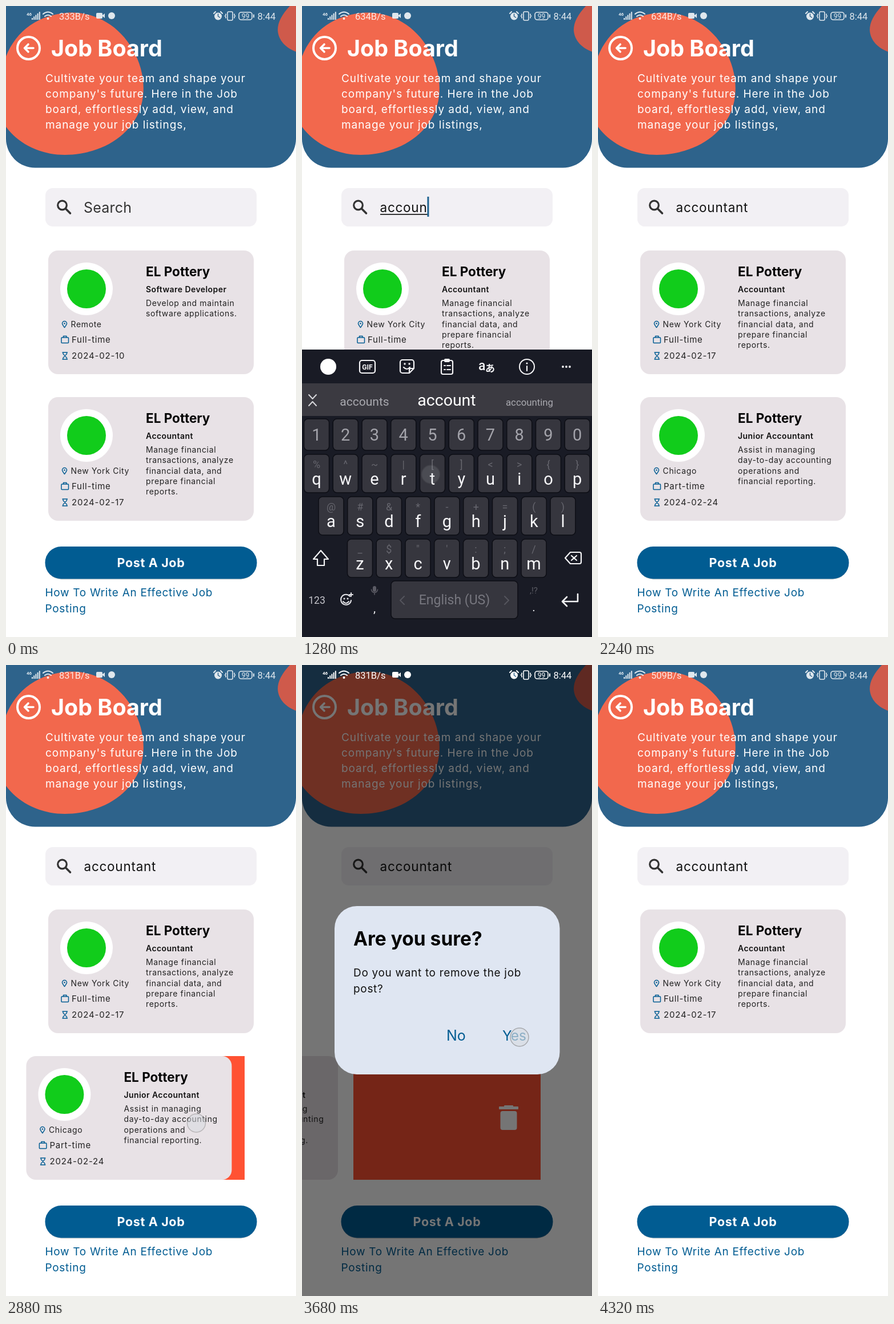
Animation, 508 px wide and 1102 px high, one loop 4.48 s. Source, as an HTML page:

```html
<!DOCTYPE html>
<html lang="en">
<head>
<meta charset="utf-8">
<title>Job Board</title>
<style>
  html, body { margin: 0; width: 100%; height: 100%; overflow: hidden; background: #fff; }
  svg { display: block; width: 100vw; height: 100vh; }
  text { font-family: Inter, sans-serif; white-space: pre; }
  .kb text, .status text { font-family: Roboto, "Noto Sans CJK JP", "Noto Sans CJK", sans-serif; }
  .line { fill: none; stroke-linecap: round; stroke-linejoin: round; }
  .soft { filter: blur(.7px); }
</style>
</head>
<body>
<svg id="stage" viewBox="0 0 508 1102" preserveAspectRatio="none"></svg>
<script>
const BLUE = '#015c92', LOOP = 4480, STEP = 80;
const esc = s => s.replace(/&/g, '&amp;').replace(/</g, '&lt;');
const text = (x, y, size, str, fill = '#111', more = '') =>
  `<text x="${x}" y="${y}" font-size="${size}" fill="${fill}" ${more}>${esc(str)}</text>`;
const lines = (x, y, gap, size, list, fill, more) =>
  list.map((s, i) => text(x, y + i * gap, size, s, fill, more)).join('');
const rect = (x, y, w, h, r, fill, more = '') =>
  `<rect x="${x}" y="${y}" width="${w}" height="${h}" rx="${r}" fill="${fill}" ${more}/>`;
const disc = (x, y, r, fill, more = '') => `<circle cx="${x}" cy="${y}" r="${r}" fill="${fill}" ${more}/>`;
const line = (d, color, width, more = '') =>
  `<path class="line" d="${d}" stroke="${color}" stroke-width="${width}" ${more}/>`;
const group = (id, body, more = '') => `<g id="${id}" ${more}>${body}</g>`;
const space = n => `letter-spacing="${n}"`;
const bold = 'font-weight="700"', mid = 'text-anchor="middle"';

const header = `
  <path d="M0 0H508V231A51 51 0 0 1 457 282.500H51A51 51 0 0 1 0 231Z" fill="#2e638b"/>
  <path class="soft" d="M-4 100C10 52 48 17 105 12C152 8 197 32 222 76C245 115 248 165 225 200C200 240 150 260 103 260C55 260 15 236 -4 205Z" fill="#f2684d"/>
  <path class="soft" d="M499 -2C483 15 476 28 476 42C477 60 490 74 511 81V-2Z" fill="#cf5a4b"/>` +
  disc(39.5, 73.5, 19.5, 'none', 'stroke="#fff" stroke-width="4"') +
  line('M48 73.5H33M39 67l-6.5 6.5 6.5 6.5', '#fff', 3.6) +
  text(79, 88, 39.4, 'Job Board', '#fff', bold) +
  lines(69, 133, 27, 19, ['Cultivate your team and shape your', "company's future. Here in the Job",
    'board, effortlessly add, view, and', 'manage your job listings,'], '#fff', space(.94));

const search = rect(69, 318, 370, 67, 13, '#f2f0f4') +
  disc(98.5, 348, 7.8, 'none', 'stroke="#333" stroke-width="3.2"') +
  line('M104.5 354L112.5 362', '#333', 3.6) +
  text(136, 361, 25, 'Search', '#333', 'id="hint" ' + space(.2)) +
  text(136.5, 360, 22.5, '', '#111', 'id="query" ' + space(.75)) +
  rect(137, 363, 0, 1.8, 0, '#222', 'id="underline"') +
  rect(136.5, 333, 3, 35, 0, '#1f6391', 'id="caret"');

function card(id, title, place, kind, date, about) {
  return group(id, rect(74, 427, 360, 216, 17, '#e8e2e6') +
    disc(141, 494, 46, '#fff') + disc(141, 494, 34, '#11cc1b') +
    line('M102.5 561.5C99.5 557.5 98.5 556 98.5 554.5a4 4 0 0 1 8 0C106.5 556 105.5 557.5 102.5 561.5Z', BLUE, 1.5) +
    disc(102.5, 554.5, 1.3, BLUE) +
    rect(97, 579, 12.5, 9.5, 1, 'none', `stroke="${BLUE}" stroke-width="1.5"`) +
    line('M100.5 578.5v-2h5.5v2', BLUE, 1.5) +
    line('M99 605h8.5M99 617h8.5M100 605v2.5l6.5 7v2.5M106.5 605v2.5l-6.5 7v2.5', BLUE, 1.4) +
    text(113.5, 561, 14, place, '#222', space(.65)) +
    text(115, 588, 15, kind, '#222', space(.75)) +
    text(115, 616, 15, date, '#222', space(.82)) +
    text(245, 472, 22.5, 'EL Pottery', '#050505', bold) +
    text(245, 500, 14, title, '#111', 'font-weight="600" ' + space(.43)) +
    lines(245, 524, 18.3, 14, about, '#222', space(.64)));
}

const cards = card('dev', 'Software Developer', 'Remote', 'Full-time', '2024-02-10',
    ['Develop and maintain', 'software applications.']) +
  card('acc', 'Accountant', 'New York City', 'Full-time', '2024-02-17',
    ['Manage financial', 'transactions, analyze', 'financial data, and', 'prepare financial', 'reports.']) +
  group('bin', rect(90, 683, 328, 216, 0, '#ff5233') +
    rect(345, 771, 34, 5, 1, '#fff') + rect(354, 769, 16, 4, 1, '#fff') + rect(347.5, 779, 29, 33, 4, '#fff')) +
  card('junior', 'Junior Accountant', 'Chicago', 'Part-time', '2024-02-24',
    ['Assist in managing', 'day-to-day accounting', 'operations and', 'financial reporting.']);

const footer = rect(69, 945.5, 370, 56, 28, '#000', 'class="soft" opacity=".2"') + rect(68.5, 944, 371, 56.5, 28, BLUE) +
  text(194.5, 980, 21.5, 'Post A Job', '#fff', bold + space(.65)) +
  lines(68.5, 1031, 28, 19, ['How To Write An Effective Job', 'Posting'], BLUE, space(.7));

// Keyboard
const ROWS = [
  { x: 25.5, y: 783, keys: 'qwertyuiop', hints: '%^~|[]<>{}' },
  { x: 51, y: 857, keys: 'asdfghjkl', hints: '@#&*-+=()' },
  { x: 101.5, y: 931, keys: 'zxcvbnm', hints: '_$"\':;/' }
];
const PITCH = 50.75;
const keycap = (x, y, w, h) => rect(x, y, w, h, 7, '#36363e', 'stroke="#0d0e15" stroke-width="1.5"');
const keyPos = ch => {
  const row = ROWS.find(r => r.keys.includes(ch));
  return [row.x + PITCH * row.keys.indexOf(ch) - 3, row.y + 35];
};
const white = (d, w = 2.2) => line(d, '#f4f4f6', w);
const box = (x, y, w, h, r) => rect(x, y, w, h, r, 'none', 'stroke="#f4f4f6" stroke-width="2.2"');

const toolbar = disc(46, 630, 14, '#fff') +
  box(101, 619, 27, 22, 4) + text(114.5, 635, 12, 'GIF', '#f4f4f6', mid + ' ' + bold) +
  white('M176 618h16a4 4 0 0 1 4 4v11l-8 8h-12a4 4 0 0 1-4-4v-15a4 4 0 0 1 4-4M196 633h-5a3 3 0 0 0-3 3v5M178 631q6 6 11 0') +
  disc(180, 625, 1.7, '#f4f4f6') + disc(188, 625, 1.7, '#f4f4f6') +
  box(244, 619, 20, 24, 3) + rect(249, 616, 10, 6, 2, '#f4f4f6') + white('M249 628h2M254 628h6M249 635h2M254 635h6', 2) +
  text(309, 636, 23, 'a', '#f4f4f6', 'font-weight="500"') + text(321, 639, 17, 'あ', '#f4f4f6', bold) +
  disc(394, 630, 13, 'none', 'stroke="#f4f4f6" stroke-width="2"') + disc(394, 624, 1.6, '#f4f4f6') + white('M394 629v8') +
  [457, 463, 469].map(x => disc(x, 630, 1.9, '#f4f4f6')).join('');

const bottomRow = white('M33 951L20 966H27V977H39V966H46Z') +
  white('M470 954H486a3 3 0 0 1 3 3v14a3 3 0 0 1-3 3H470L461 964ZM472 960l9 8M481 960l-9 8') +
  text(26, 1044, 17.5, '123', '#c4c4ca', mid) +
  line('M84 1031A9 9 0 1 0 86 1038M72 1040q5 6 10 0M83 1028h6M86 1025v6', '#e4e4e8', 2) +
  disc(74, 1035, 1.5, '#e4e4e8') + disc(80, 1035, 1.5, '#e4e4e8') +
  rect(124, 1013, 6, 10, 3, '#5c5c65') + line('M121.5 1019a5.5 5.5 0 0 0 11 0M127 1025v3', '#5c5c65', 1.5) +
  text(127, 1059, 21, ',', '#f4f4f6', mid) +
  keycap(156, 1004, 222, 66) + text(267, 1045, 23, 'English (US)', '#77777f', mid) +
  line('M179 1031l-7 7 7 7M355 1031l7 7-7 7', '#55555d', 2) +
  text(406, 1026, 15, ',!?', '#5c5c65', mid) + text(406, 1057, 21, '.', '#f4f4f6', mid) +
  white('M483 1027V1040H457M464 1032l-8 8 8 8', 2.6);

const keyboard = group('kb',
  rect(0, 600, 508, 502, 0, '#191b25') + rect(0, 659, 508, 57, 0, '#3b3a41') + toolbar +
  line('M12 679l6.5 7 6.5-7M12 698l6.5-7 6.5 7', '#d6d6da', 2) +
  [109.5, 253.5, 398.5].map((x, i) => text(x, 698, 27, '', i == 1 ? '#fff' : '#a9a9af', mid + ' class="word"')).join('') +
  [...'1234567890'].map((n, i) => {
    const x = 25.5 + PITCH * i;
    return keycap(x - 22, 721, 44, 55) + text(x, 759, 29, n, '#a4a4ab', mid);
  }).join('') +
  ROWS.map(r => [...r.keys].map((k, i) => {
    const x = r.x + PITCH * i;
    return keycap(x - 22, r.y, 44, 67) + text(x, r.y + 24, 18, r.hints[i], '#66666e', mid) +
      text(x, r.y + 53, 29, k, '#f8f8fa', mid);
  }).join('')).join('') + bottomRow, 'class="kb"');

const dialog = group('dialog', rect(0, 0, 508, 1102, 0, '#000', 'opacity=".54"') +
  rect(57, 421, 394.5, 294, 39, '#dfe6f2') +
  text(90, 490, 33.5, 'Are you sure?', '#050505', bold) +
  lines(90, 544, 28, 19, ['Do you want to remove the job', 'post?'], '#111', space(.68)) +
  text(253, 656, 25, 'No', BLUE) + text(351, 656, 24.5, 'Yes', BLUE));

const thin = (d, w = 1.6) => line(d, '#fff', w);
const status = group('status',
  text(36, 17, 8, '46', '#fff', bold) +
  [0, 1, 2, 3, 4].map(i => rect(45 + i * 3.2, 21 - i * 2.7, 2, 3 + i * 2.7, 0, '#fff')).join('') +
  thin('M65 14q8.500-7 17 0M68 18q5.500-4.500 11 0', 2) + disc(73.5, 22, 2, '#fff') +
  text(93, 24, 16.5, '', '#fff', 'id="speed"') +
  rect(158, 12, 11, 10, 2, '#fff') + '<path d="M168 17l5-4v8Z" fill="#fff"/>' +
  disc(185, 17, 6, '#fff') +
  disc(371.5, 18, 6.5, '#fff') + thin('M364 13l3-3M379 13l-3-3', 2) + line('M371.500 14v4l3 2', '#2e638b', 1.5) +
  rect(388, 10, 9, 15, 2, 'none', 'stroke="#fff" stroke-width="1.6"') + thin('M385 14v2l-1.500 1.500 1.500 1.500v2M400 14v2l1.500 1.500-1.500 1.500v2') +
  rect(408, 11, 23, 13, 4, 'none', 'stroke="#fff" stroke-width="1.6"') + thin('M434 15.500v4', 2) +
  text(419.5, 22, 12, '99', '#fff', mid) + text(440.5, 24, 16.5, '8:44', '#fff'), 'class="status"');

const stage = document.getElementById('stage');
stage.innerHTML = header + search + cards + footer + keyboard + dialog + status +
  disc(0, 0, 16, '#d8dce2', 'id="touch" stroke="#888" stroke-width="1.5"');
const $ = id => document.getElementById(id);
const words = document.querySelectorAll('.word');

// Timeline
const TERM = 'accountant';
const TYPED = [640, 720, 880, 960, 1120, 1200, 1440, 1600, 1760, 1920];
const WORDS = ['sho ma Ana', 'as a and', 'act ac across', 'access acc account', 'accord account according',
  'accounts account accounting', 'accounts account accounting', 'accounts account accounting',
  'accounts accounta accountant', 'accountants accountant accounting', 'accountants accountant accounting'];
const SPEEDS = [[4000, 509], [2560, 831], [880, 634], [0, 333]];
const ramp = (t, a, b) => Math.max(0, Math.min(1, (t - a) / (b - a)));
const ease = p => p * p * (3 - 2 * p);
const show = (el, on) => el.setAttribute('display', on ? 'inline' : 'none');
const move = (el, x, y) => el.setAttribute('transform', `translate(${x} ${y})`);

function touchAt(t) {
  if (t >= 80 && t < 240) return [250, 352, .5];
  if (t >= 2880 && t < 3120) return [385 - 330 * ease(ramp(t, 2800, 3120)), 800, .5];
  if (t >= 3600 && t < 3760) return [381, 650, .65];
  const i = TYPED.findIndex(at => t >= at - 160 && t < at);
  return i < 0 ? null : [...keyPos(TERM[i]), .13];
}

function draw(t) {
  const count = TYPED.filter(at => t >= at).length;
  const focused = t >= 160 && t < 2080, filtered = count > 1;

  show($('hint'), t < 160);
  $('query').textContent = TERM.slice(0, count);
  const width = count ? $('query').getComputedTextLength() : 0;
  $('underline').setAttribute('width', width);
  show($('underline'), focused);
  $('caret').setAttribute('x', 136.5 + width);
  show($('caret'), focused);

  const up = ease(ramp(t, 160, 400)) - ease(ramp(t, 1960, 2200));
  move($('kb'), 0, 502 * (1 - up));
  show($('kb'), up > 0);
  WORDS[count].split(' ').forEach((w, i) => {
    words[i].textContent = w;
    words[i].setAttribute('font-size', Math.min(i == 1 ? 28.5 : 27, (i == 1 ? 220 : 168) / w.length));
  });

  show($('dev'), !filtered);
  move($('acc'), 0, filtered ? 0 : 256);
  show($('junior'), filtered && t < 3920);
  move($('junior'), -371 * ease(ramp(t, 2800, 3200)), 256);
  const shrink = 1 - ease(ramp(t, 3840, 4080));
  $('bin').setAttribute('transform', `translate(0 683) scale(1 ${shrink}) translate(0 -683)`);
  show($('bin'), t >= 2880 && shrink > 0);

  const fade = ramp(t, 3200, 3440) - ramp(t, 3680, 3840);
  $('dialog').setAttribute('opacity', fade);
  $('status').setAttribute('opacity', .85 + .15 * fade);
  $('speed').textContent = SPEEDS.find(s => t >= s[0])[1] + 'B/s';

  const touch = touchAt(t);
  show($('touch'), touch);
  if (touch) {
    move($('touch'), touch[0], touch[1]);
    $('touch').setAttribute('opacity', touch[2]);
  }
}

function tick() {
  draw(Math.floor(performance.now() % LOOP / STEP) * STEP);
  requestAnimationFrame(tick);
}
tick();
</script>
</body>
</html>
```
